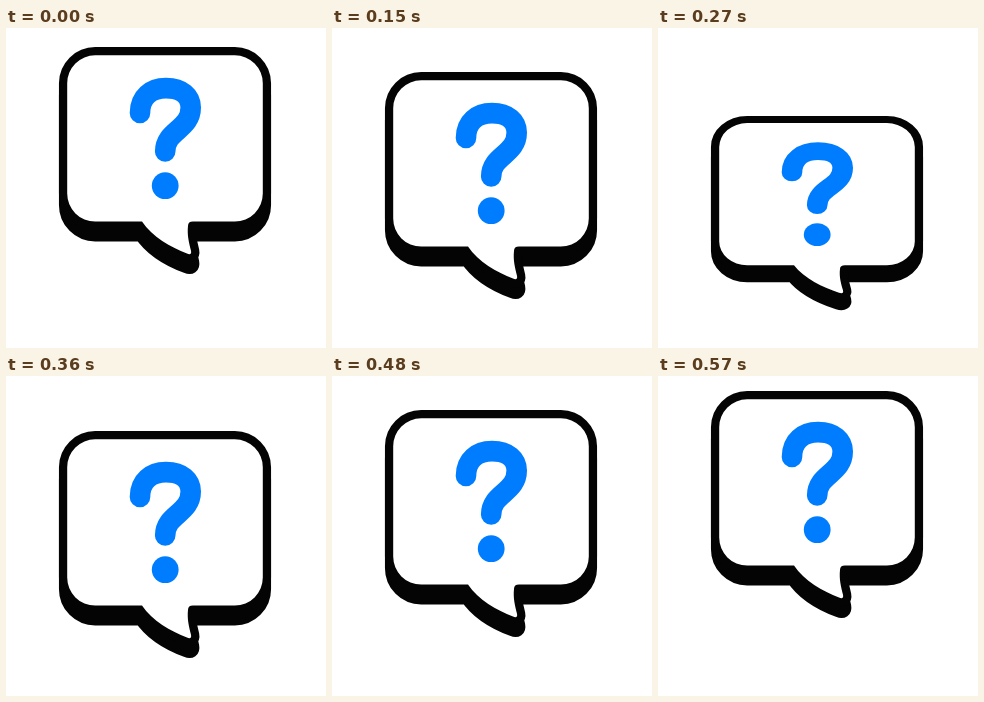
An HTML page with a canvas that plays this animation: 320 px wide and 320 px high, repeating every 0.62 s.

```html
<!DOCTYPE html>
<html lang="en">
<head>
<meta charset="utf-8">
<title>Bouncing question</title>
<style>
  html, body { margin: 0; width: 100%; height: 100%; overflow: hidden; background: #fff; }
  canvas { display: block; width: 320px; height: 320px; }
</style>
</head>
<body>
<canvas id="stage" width="320" height="320"></canvas>
<script>
const ctx = document.getElementById('stage').getContext('2d');
const LOOP = 620, STEP = 30, GROUND = 283, SQUASH = 195 / 228;
const RIM = 16.5, DEPTH = 11.6;
const INK = '#040404', BLUE = '#007dff';

// All shapes are drawn resting on the ground line.
const bubble = new Path2D(`M89.2 63.3 H228.8 A28 28 0 0 1 256.8 91.3 V201.6
  A28 28 0 0 1 228.8 229.6 H187 Q182 229.6 182 234 C181 243 183 251 185 258.7
  Q186 263.6 181 261.6 C165 255.6 146 244.8 136 229.6 H89.2
  A28 28 0 0 1 61.2 201.6 V91.3 A28 28 0 0 1 89.2 63.3 Z`);
const hook = new Path2D(`M134 121 C134 105 145 96.1 160 96.1 C176 96.1 184.7 104.5 184.7 115.5
  C184.7 138 159.2 138 159.2 159.4`);

// The motion advances in held steps, with a longer rest at the squash.
function heldTime(t) {
  const s = Math.min(Math.floor(t / STEP) * STEP, 570);
  return s === 300 ? 270 : s;
}

function pose(t) {
  if (t < 240) return { lift: Math.max(0, Math.round(36 - t / 6)), scale: 1 };
  if (t < 360) return { lift: 0, scale: t === 270 ? SQUASH : (1 + SQUASH) / 2 };
  if (t < 570) return { lift: Math.round((t - 360) * 32 / 180), scale: 1 };
  return { lift: 40, scale: 1 };
}

function drawSlab(dy) {
  ctx.save();
  ctx.translate(0, dy);
  ctx.fill(bubble);
  ctx.stroke(bubble);
  ctx.restore();
}

function draw({ lift, scale }) {
  ctx.setTransform(1, 0, 0, 1, 0, 0);
  ctx.fillStyle = '#fff';
  ctx.fillRect(0, 0, 320, 320);
  ctx.translate(0, GROUND - lift);
  ctx.scale(1, scale);
  ctx.translate(0, -GROUND);
  ctx.lineJoin = ctx.lineCap = 'round';

  ctx.fillStyle = ctx.strokeStyle = INK;
  ctx.lineWidth = RIM;
  drawSlab(DEPTH);
  drawSlab(0);
  ctx.fillStyle = '#fff';
  ctx.fill(bubble);

  ctx.fillStyle = ctx.strokeStyle = BLUE;
  ctx.lineWidth = 20.6;
  ctx.stroke(hook);
  ctx.beginPath();
  ctx.arc(159.2, 193.7, 13.4, 0, Math.PI * 2);
  ctx.fill();
}

const start = performance.now();
function frame() {
  draw(pose(heldTime((performance.now() - start) % LOOP)));
  requestAnimationFrame(frame);
}
frame();
</script>
</body>
</html>
```
